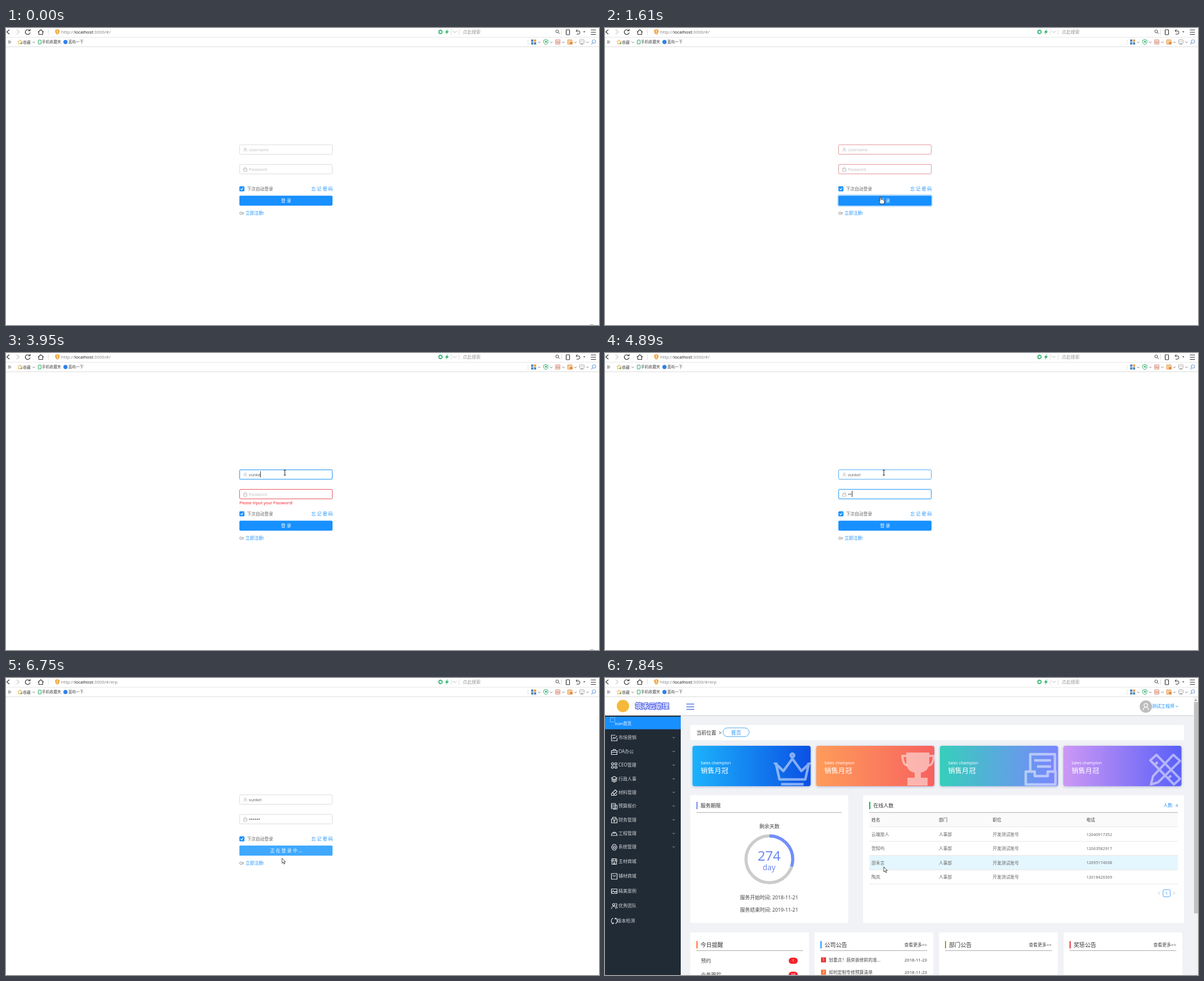
These frames come from a looping animation (1057x530 px, 8 s). An HTML page with a canvas:

```html
<!DOCTYPE html>
<html lang="zh">
<head>
<meta charset="utf-8">
<title>Login</title>
<style>
html, body { margin: 0; width: 100%; height: 100%; overflow: hidden; background: #fff; }
canvas { display: block; }
</style>
</head>
<body>
<canvas id="stage" width="1057" height="530"></canvas>
<script>
const ctx = document.getElementById('stage').getContext('2d');
const FONT = '"Noto Sans", "Noto Sans CJK SC", "Noto Sans CJK", sans-serif';
const BLUE = '#1890ff', RED = '#f5222d', GREY = '#666', INK = '#444';
const LOOP = 8000, DASHBOARD = 6840;
const USER = 'vunkel';
const userKeys = [3100, 3400, 3590, 3720, 3950, 4120];
const passKeys = [4650, 4800, 5190, 5420, 5650, 5820];
ctx.lineJoin = 'round';

// ---- helpers ----
const ramp = (t, a, b) => Math.min(1, Math.max(0, (t - a) / (b - a)));
const pulse = (t, a, b, c, d) => ramp(t, a, b) - ramp(t, c, d);
const between = (t, a, b) => t >= a && t < b;

function text(s, x, y, size, color = GREY, align = 'left', weight = 400) {
  ctx.font = `${weight} ${size}px ${FONT}`;
  ctx.textAlign = align;
  ctx.fillStyle = color;
  ctx.fillText(s, x, y + size * 0.36);
  return x + ctx.measureText(s).width;
}
function rect(x, y, w, h, color) {
  ctx.fillStyle = color;
  ctx.fillRect(x, y, w, h);
}
function round(x, y, w, h, r, fill, stroke, width = 1) {
  ctx.beginPath();
  ctx.roundRect(x, y, w, h, r);
  if (fill) { ctx.fillStyle = fill; ctx.fill(); }
  if (stroke) { ctx.strokeStyle = stroke; ctx.lineWidth = width; ctx.stroke(); }
}
function disc(x, y, r, color) {
  round(x - r, y - r, 2 * r, 2 * r, r, color);
}
function path(d, x, y, stroke, width = 1, fill) {
  const p = new Path2D(d);
  ctx.save();
  ctx.translate(x, y);
  if (fill) { ctx.fillStyle = fill; ctx.fill(p); }
  if (stroke) { ctx.strokeStyle = stroke; ctx.lineWidth = width; ctx.stroke(p); }
  ctx.restore();
}
function faded(alpha, draw) {
  if (alpha <= 0) return;
  ctx.save();
  ctx.globalAlpha = alpha;
  draw();
  ctx.restore();
}
function shadowed(color, blur, draw) {
  ctx.save();
  ctx.shadowColor = color;
  ctx.shadowBlur = blur;
  ctx.shadowOffsetY = 1;
  draw();
  ctx.restore();
}
const chevron = (x, y, color) => path('M-2-1L0 1L2-1', x, y, color);
const person = (x, y, s, color) => {
  ctx.save();
  ctx.translate(x, y);
  ctx.scale(s, s);
  path('M-2-1.5a2 2 0 1 0 4 0a2 2 0 1 0-4 0M-3 4a3 3.4 0 0 1 6 0', 0, 0, color, 0.8);
  ctx.restore();
};

// ---- browser bars ----
function browser(t) {
  rect(0, 0, 1057, 34, '#fff');
  rect(0, 16, 1057, 1, '#e6e6e6');
  rect(0, 33, 1057, 1, '#dcdcdc');
  path('M6 3L1.500 7L6 11', 0, 0, '#333', 1.2);
  path('M19 3L23.500 7L19 11', 0, 0, '#ccc', 1.2);
  path('M42 4.500A4.300 4.300 0 1 0 43 8M43 2V5H39.500', 0, 0, '#333', 1.2);
  path('M57 7.500L62 3L67 7.500M58.500 6.500V11.500H65.500V6.500', 0, 0, '#333', 1.1);
  for (const x of [75, 793, 807, 990]) rect(x, 2, 1, 10, '#ddd');
  path('M87.500 3.500L91.500 2L95.500 3.500V7Q95 10 91.500 12Q88 10 87.500 7Z', 0, 0, null, 1, '#f0ad4e');
  rect(91, 4, 1, 4, '#fff');
  rect(91, 9, 1, 1, '#fff');
  let x = text('http://', 98.5, 7, 7.9, '#888');
  x = text('localhost', x, 7, 7.9, '#222');
  text(':3000/#/' + (t > 6600 ? 'erp' : ''), x, 7, 7.9, '#888');

  path('M771.500 7a3 3 0 1 0 6 0a3 3 0 1 0-6 0', 0, 0, '#3bb577', 1.8);
  path('M787.500 2L782.500 8H785.500L784 12L789.500 6H786.500Z', 0, 0, null, 1, '#2fb36c');
  path('M796.500 5L800 8.500L803.500 5', 0, 0, '#bbb');
  text('点此搜索', 814, 7, 8, '#999');
  path('M980 6a2.500 2.500 0 1 0 5 0a2.500 2.500 0 1 0-5 0M984.500 8L987 10.500', 0, 0, '#444');
  round(998.5, 3, 6, 9, 1, null, '#333', 1.2);
  path('M1018.500 2.500L1016 5L1018.500 7.500M1016 5H1020Q1023 5 1023 8T1020 11H1017', 0, 0, '#333');
  path('M1029 6H1032.500L1030.700 8Z', 0, 0, null, 1, '#333');
  path('M1042.500 3.500H1051.500M1042.500 7.500H1051.500M1042.500 11.500H1051.500', 0, 0, '#333');

  path('M4.500 22V28M6.500 22.500L9 25L6.500 27.500Z', 0, 0, '#666', 0.8);
  path('M25 21L26.200 23.700L29 24L27 26L27.500 29L25 27.500L22.500 29L23 26L21 24L23.800 23.700Z', 0, 0, '#f0a030', 0.9);
  rect(26, 26, 3, 2, '#4cb85c');
  text('收藏', 30, 25, 7, INK);
  chevron(49.5, 25.5, '#777');
  round(57.5, 21.5, 5, 7, 1, null, '#35b36b', 1.1);
  text('手机收藏夹', 64, 25, 6.8, INK);
  disc(106, 25, 3.7, '#2f7fe8');
  text('蓝屿一下', 111, 25, 6.8, INK);

  for (const y of [22, 25, 28]) rect(930, y, 1, 1, '#aaa');
  for (const bx of [936, 941]) for (const y of [20.5, 25.5]) {
    rect(bx, y, 4, 4, bx > 940 && y < 25 ? '#e9a04c' : '#4f86b8');
  }
  path('M958.500 22L962 20.500L966 22V25.500Q965.500 28 962 29.500Q959 28 958.500 25.500Z', 0, 0, '#45b77d', 1.1);
  rect(961, 23, 3, 3, '#45b77d');
  round(979.5, 21, 8, 8, 0.5, '#f6dcd5', '#d99a8b');
  text('Aa', 983.5, 25, 5, '#c0604c', 'center');
  round(1001, 21, 8, 8, 0.5, '#f6cf9f', '#e3a05f');
  rect(1005, 25, 5, 4, '#e58a3c');
  round(1022.5, 21, 8, 6.5, 1, null, '#aaa');
  path('M1025 23.500V25M1028 23.500V25M1024 29H1029', 0, 0, '#888');
  for (const bx of [950.5, 972, 993.5, 1015, 1036.5]) chevron(bx, 25.5, '#777');
  path('M1045 24a3 3 0 1 0 6 0a3 3 0 1 0-6 0M1046 26L1043.500 29', 0, 0, '#7fa8d8', 1.2);
}

// ---- login page ----
function field(y, error, active, focused) {
  const box = (color, width, fill) => round(416.4, y + 0.4, 165.2, 16.9, 2, fill, color, width);
  box('#d9d9d9', 0.9, '#fff');
  for (const [color, alpha] of [['#f2404a', error], ['#40a9ff', active]]) {
    faded(alpha * 0.2, () => focused && box(color, 3));
    faded(alpha, () => box(color, 0.85));
  }
}
function caret(t, x, y, focusAt, keys) {
  const last = keys.filter(k => k <= t).pop() || focusAt;
  if ((t - last) % 1060 < 530) rect(Math.round(x), y, 1, 11, '#333');
}
function message(s, y, alpha) {
  faded(alpha, () => text(s, 416, y - 3 * (1 - alpha), 7.2, RED));
}
function login(t) {
  const onUser = between(t, 2100, 4270), onPass = between(t, 4270, 6450);
  field(208, pulse(t, 1530, 1690, 3100, 3300), pulse(t, 3100, 3300, 5190, 5450), onUser);
  field(243, pulse(t, 1530, 1690, 4650, 4850), pulse(t, 4650, 4850, 6450, 6700), onPass);
  person(426.5, 217, 0.85, '#aaa');
  path('M423.500 251.500H429.500V255.500H423.500ZM424.700 251V249.500Q426.500 247 428.300 249.500V251', 0, 0, '#aaa', 0.8);

  const typed = USER.slice(0, userKeys.filter(k => k <= t).length);
  const end = text(typed || 'Username', 433, 217, 7.2, typed ? GREY : '#bfbfbf');
  if (onUser) caret(t, typed ? end : 433, 211, 2100, userKeys);
  const dots = passKeys.filter(k => k <= t).length;
  if (!dots) text('Password', 433, 252, 7.2, '#bfbfbf');
  for (let i = 0; i < dots; i++) disc(434.7 + i * 3.3, 252, 1.1, '#555');
  if (onPass) caret(t, 433 + dots * 3.3, 246, 4270, passKeys);

  message('Please input your username!', 232.5, pulse(t, 1690, 1850, 3100, 3300));
  message('Please input your Password!', 267.5, pulse(t, 1690, 1850, 4650, 4850));

  round(416, 282.5, 9, 9, 1.5, BLUE);
  path('M418.200 287L420 288.800L423 285', 0, 0, '#fff', 1.1);
  text('下次自动登录', 429.5, 287, 7.75);
  text('忘 记 密 码', 582.5, 287, 8, BLUE, 'right');

  const wave = ramp(t, 1530, 1900);
  if (t > 1530) faded(0.35 * (1 - wave), () => round(415, 298, 168, 20, 3, null, BLUE, 2 + wave * 2));
  const button = color => round(416, 299.3, 166, 17.6, 2, color);
  button(BLUE);
  const light = pulse(t, 530, 600, 650, 750) + pulse(t, 1330, 1400, 1530, 1600)
    + pulse(t, 1650, 1750, 2100, 2250) + ramp(t, 6100, 6250);
  faded(light, () => button('#40a9ff'));
  text(t < 6520 ? '登 录' : '正 在 登 录 中 ...', 499.3, 308, 8, '#fff', 'center');
  text('Or', 416, 330, 7.2);
  text('立即注册!', 427, 330, 7.7, BLUE);
  if (t < 1200 || between(t, 2200, 4300)) rect(1041, 529, 6, 1, '#aaa');
}

// ---- dashboard ----
const menu = [
  ['市场营销', 106.5, 'M8 1H1V11H11V6M3 8L5 5L7 7L11 2'],
  ['OA办公', 131, 'M1 4H11V11H1ZM4 4V2H8V4M1 7H11'],
  ['CEO管理', 155.5, 'M1 3a2 2 0 1 0 4 0a2 2 0 1 0-4 0M7 3a2 2 0 1 0 4 0a2 2 0 1 0-4 0M1 9a2 2 0 1 0 4 0a2 2 0 1 0-4 0M7 9a2 2 0 1 0 4 0a2 2 0 1 0-4 0'],
  ['行政人事', 180, 'M6 1L11 4L6 7L1 4ZM1 6L6 9L11 6M1 8.500L6 11.500L11 8.500'],
  ['材料管理', 204, 'M1 11V8L8 1L11 4L4 11ZM5 11H9L11 8M3 6L6 9'],
  ['预算报价', 228.5, 'M1 1H8V10H1ZM8 4H11V11H4M1 4H8M1 7H8'],
  ['财务管理', 253, 'M1 4H11V11H1ZM3 4V1H9V4M4 6L6 8L8 6M6 8V10'],
  ['工程管理', 277.5, 'M1 9A5 6 0 0 1 11 9ZM5 3V6M7 3V6'],
  ['系统管理', 301.5, 'M4 1H8L11 6L8 11H4L1 6ZM4 6a2 2 0 1 0 4 0a2 2 0 1 0-4 0'],
  ['主材商城', 327, 'M2 1H10L11 5H1ZM2 5V11H10V5M4 1V5M8 1V5M5 11V8H7V11'],
  ['辅材商城', 353.5, 'M1 1H11V11H1ZM3.500 4Q6 8 8.500 4'],
  ['精美案例', 380, 'M1 2H11V10H1ZM1 9L4 5L7 8L9 6L11 8'],
  ['优秀团队', 406.5, 'M3 3.500a2 2 0 1 0 4 0a2 2 0 1 0-4 0M1 11A4 4.500 0 0 1 9 11M8 1.500A2 2 0 0 1 9 6Q11 7 11.500 10'],
  ['版本检测', 433, 'M4 1A5.500 5.500 0 0 0 4 11M8 1A5.500 5.500 0 0 1 8 11M2 11H4.500V8.500M10 1H7.500V3.500'],
];
const people = [
  ['云端旅人', '12040917352'], ['贺知屿', '12063582917'],
  ['邵禾言', '12095174038'], ['陶岚', '12018426309'],
];
const cards = [
  [156, '#1cb2fc', '#0b50e4'], [376.5, '#ff9c5a', '#f7625f'],
  [597, '#36cfba', '#7b85ff'], [817, '#cd98f5', '#5960f8'],
];
const notices = [
  [152, '今日提醒', '#ff7033'], [373.5, '公司公告', BLUE],
  [595.5, '部门公告', '#b8901c'], [817.5, '奖惩公告', '#e8383d'],
];

function sidebar(t) {
  const active = t >= 7220;
  rect(0, 67, 135, 463, '#212b36');
  if (active) rect(0, 69, 135, 22.5, BLUE);
  path('M9.500 70.500H17.500V78.500H9.500Z', 0, 0, active ? '#8cc4f5' : '#bbb', 0.8);
  text('icon首页', 17.5, 81, 7.5, active ? '#fff' : '#c4c8cc');
  menu.forEach(([label, y, icon], i) => {
    path(icon, 10.5, y - 5.5, '#e8eaec', 1.15);
    text(label, i == 13 ? 21.5 : 24, y, 8, '#d0d3d6');
    if (i < 9) chevron(122.5, y, '#a5abb1');
  });
}
function header() {
  shadowed('rgba(0,21,41,.12)', 3, () => rect(0, 34, 1049, 32, '#fff'));
  rect(0, 34, 135, 33, '#fff');
  disc(32, 50, 11, '#f5b83a');
  ctx.font = `700 12px ${FONT}`;
  ctx.textAlign = 'left';
  ctx.strokeStyle = '#5263e4';
  ctx.lineWidth = 2.2;
  ctx.strokeText('筑禾云助理', 54, 55.3);
  text('筑禾云助理', 54, 51, 12, '#e6e9ff', 'left', 700);
  path('M145 46.500H159M145 51.500H159M145 56H159', 0, 0, '#5577e8', 1.3);
  disc(964, 51, 11, '#bdbdbd');
  person(964, 51, 1.6, '#fff');
  text('测试工程师', 975, 50.5, 8, BLUE);
  chevron(1019.5, 50.5, BLUE);
}
function salesCards() {
  for (const [x, from, to] of cards) {
    const g = ctx.createLinearGradient(x, 0, x + 210.5, 0);
    g.addColorStop(0, from);
    g.addColorStop(1, to);
    shadowed('rgba(70,90,170,.4)', 4, () => round(x, 121, 210.5, 72, 4, g));
    text('Sales champion', x + 14.5, 151, 7.3, '#fff');
    text('销售月冠', x + 14.5, 166, 12.3, '#fff');
  }
  const veil = 'rgba(255,255,255,.5)';
  path('M305 154L318 166L334 144L350 166L363 154L357 181H311ZM314 189.500H354M331 138a3 3 0 1 0 6 0a3 3 0 1 0-6 0M302.500 151a1.500 1.500 0 1 0 3 0M362.500 151a1.500 1.500 0 1 0 3 0', 0, 0, veil, 4.5);
  path('M537 133H578V150Q578 166 563 169V178H575V192H539V178H552V169Q537 166 537 150Z', 0, 0, null, 1, veil);
  path('M537 139H530Q531 155 539 156M578 139H586Q585 155 577 156', 0, 0, veil, 4);
  path('M758 166V136H802V166M765 147H795M770 158H795M750 167H766V175H789V167H803V190H750Z', 0, 0, veil, 4.5);
  path('M972 147L983 137L1025 180L1014 190ZM980 155L985 150M988 163L993 158M1004 179L1009 174M1013 137L1025 148L986 186L973 190L977 175Z', 0, 0, veil, 4);
}
function panelTitle(x, y, label, color, right, size = 9) {
  rect(x, y - 6.5, 2, 13, color);
  text(label, x + 7.2, y, size, '#333');
  rect(x, y + 12 - (size > 9 ? 2 : 0), right - x, 1, '#aaa');
}
function servicePanel() {
  rect(152, 209, 281.5, 228, '#fff');
  panelTitle(163, 227.5, '服务期限', '#7089f8', 422);
  text('剩余天数', 293, 264.5, 9, INK, 'center');
  const arc = (to, color) => {
    ctx.beginPath();
    ctx.arc(293, 323.5, 41.7, -Math.PI / 2, -Math.PI / 2 + to * 2 * Math.PI);
    ctx.strokeStyle = color;
    ctx.lineWidth = 5.5;
    ctx.stroke();
  };
  arc(1, '#ccc');
  arc(0.3, '#728ffb');
  text('274', 292.5, 317, 24, '#6f88f8', 'center');
  text('day', 292.5, 338, 13.6, '#6f88f8', 'center');
  text('服务开始时间: 2018-11-21', 292.5, 391.5, 8.8, INK, 'center');
  text('服务结束时间: 2019-11-21', 292.5, 413.5, 8.8, INK, 'center');
}
function onlinePanel(t) {
  rect(460, 209, 572, 228, '#fff');
  panelTitle(471, 227.5, '在线人数', '#21a84f', 1021);
  text('人数:  4', 1021.5, 227.5, 7.8, BLUE, 'right');
  rect(471, 241, 550, 25, '#fafafa');
  const columns = [475, 595, 691, 858];
  ['姓名', '部门', '职位', '电话'].forEach((s, i) => text(s, columns[i], 253.5, 7.8, INK));
  faded(0.5 + 0.5 * ramp(t, 6840, 7070), () => rect(471, 317, 550, 25, '#e4f6fe'));
  for (let i = 0; i < 5; i++) rect(471, Math.floor(265.5 + i * 25.5), 550, 1, '#e8e8e8');
  people.forEach(([name, phone], i) => {
    const y = 279 + i * 25.4;
    [name, '人事部', '开发测试账号'].forEach((s, c) => text(s, columns[c], y, 7.8));
    text(phone, 858, y, 7.3);
  });
  path('M989 381.500L986.500 384L989 386.500', 0, 0, '#bbb');
  path('M1013 381.500L1015.500 384L1013 386.500', 0, 0, '#bbb');
  round(994.8, 377.7, 12.6, 12.6, 2, '#fff', BLUE, 0.8);
  text('1', 1001, 384, 7.5, BLUE, 'center');
}
function noticePanels() {
  notices.forEach(([x, label, color], i) => {
    rect(x, 454, 211.5, 76, '#fff');
    panelTitle(Math.floor(x + 11), 476, label, color, x + 201, 10.1);
    if (i) text('查看更多>>', x + 200.5, 476, 7.9, INK, 'right', 500);
  });
  [['预约', 504.5, '1'], ['业务跟踪', 529.5, '99']].forEach(([label, y, count]) => {
    text(label, 171, y, 9, INK);
    round(327.5, y - 5.5, 16, 11, 5.5, RED);
    text(count, 335.5, y, 6.8, '#fff', 'center');
  });
  [['划重点！厨房装修前的准...', 503, '#ea3a3d'], ['如何定制专修预算清单', 525, '#ff7033']].forEach(([label, y, color], i) => {
    rect(385, y - 4.5, 9, 9, color);
    text(i + 1, 389.5, y, 6.5, '#fff', 'center');
    text(label, 399, y, 7.8, INK);
    text('2018-11-23', 574, y, 7.7, INK, 'right');
  });
}
function toast(t) {
  faded(pulse(t, 6760, 6840, 7580, 7830), () => {
    const y = 37 + 6 * ramp(t, 6840, 7000);
    shadowed('rgba(0,0,0,.2)', 6, () => round(491, y, 62.5, 21, 2, '#fff'));
    disc(504.5, y + 10, 4.3, '#3a9ff0');
    rect(504, y + 7.5, 1, 1, '#fff');
    rect(504, y + 9.5, 1, 3, '#fff');
    text('登录成功', 513, y + 10, 7.8);
  });
}
function dashboard(t) {
  rect(0, 34, 1057, 496, '#f0f2f5');
  header();
  sidebar(t);
  rect(1049, 34, 8, 496, '#f1f1f1');
  rect(1050, 43, 7, 377, '#c1c1c1');
  path('M1051 40.500L1053 38L1055 40.500Z', 0, 0, null, 1, '#777');
  rect(152, 84, 880, 27, '#fff');
  text('当前位置  >', 163, 97.5, 8.8, '#333');
  round(210.3, 89, 46.6, 15.6, 7.8, '#fff', '#3a9fee', 0.9);
  text(t < 7220 ? '加载中...' : '首页', 233.7, 97.5, 8.9, BLUE, 'center');
  salesCards();
  servicePanel();
  onlinePanel(t);
  noticePanels();
  toast(t);
}

// ---- pointer ----
const track = [
  [150, 920, 520], [600, 550, 310], [910, 495, 232], [990, 495, 232], [1380, 491, 301],
  [1800, 491, 301], [2080, 497, 213.5], [5190, 497, 213.5], [5460, 497, 250], [5820, 497, 250],
  [6150, 492, 306], [6680, 492, 306], [6750, 492, 321.5], [6840, 495, 327],
  [7000, 495, 327], [7220, 497, 337], [LOOP, 497, 337],
];
function pointer(t) {
  if (t < track[0][0]) return;
  const i = track.findIndex(k => k[0] > t);
  const [t0, x0, y0] = track[i - 1], [t1, x1, y1] = track[i];
  const k = ramp(t, t0, t1), x = x0 + (x1 - x0) * k, y = y0 + (y1 - y0) * k;
  const inside = (top, bottom) => x > 416 && x < 582 && y > top && y < bottom;
  const beam = t < DASHBOARD ? inside(208, 226) || inside(243, 261) : y < 333;
  if (beam) path('M-2-4.500H2M0-4.500V4.500M-2 4.500H2', x, y, '#222');
  else if (t < DASHBOARD && inside(299, 317)) {
    path('M-1 1Q0-1 1 1V5Q3 4 3.300 5.500Q5 4.800 5.300 6.200Q7 5.800 7 7.500V10L6 13H0.500L-3 8.500Q-2.500 7-1 8.300Z', x, y, '#222', 0.9, '#fff');
  } else path('M0 0V9L2 7.200L3.600 10.500L5 9.800L3.500 6.600H6.300Z', x, y, '#222', 0.8, '#fff');
}

function frame(now) {
  const t = now % LOOP;
  rect(0, 0, 1057, 530, '#fff');
  (t < DASHBOARD ? login : dashboard)(t);
  browser(t);
  pointer(t);
  requestAnimationFrame(frame);
}
requestAnimationFrame(frame);
</script>
</body>
</html>
```
